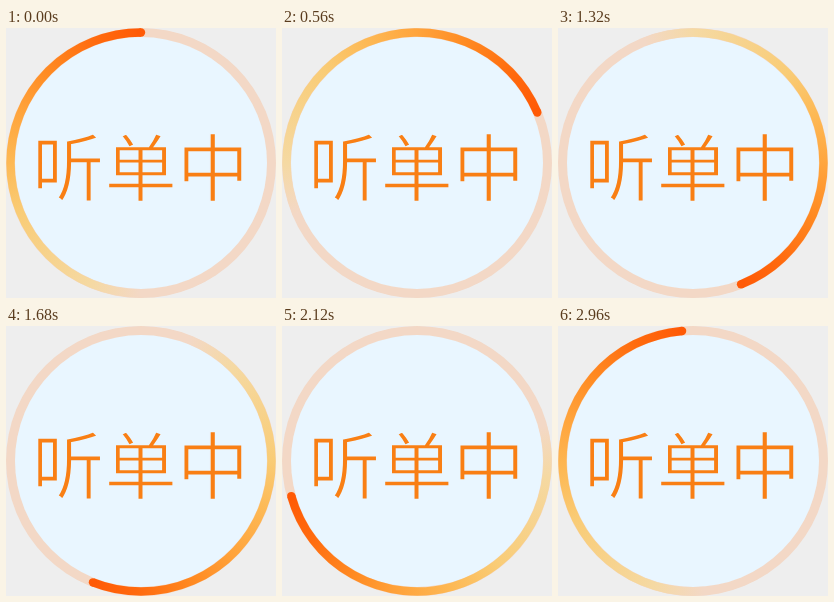
An HTML page with a canvas that plays this animation: 270 by 270 pixels, repeating every 3 s.

```html
<!DOCTYPE html>
<html lang="zh-CN">
<head>
<meta charset="utf-8">
<style>
html, body { margin: 0; width: 100%; height: 100%; overflow: hidden; background: #eee; }
canvas { display: block; }
</style>
</head>
<body>
<canvas id="stage" width="270" height="270"></canvas>
<script>
const ctx = document.getElementById('stage').getContext('2d');
const TAU = Math.PI * 2, C = 135, R = 130.5, LOOP = 3000, STEP = 40;
const TRACK_WIDTH = 9, ARC_WIDTH = 8.4;
const DISC = '#e9f6ff', TRACK = '#f3d8c6', HEAD = '#ff5a06', LABEL = '听单中';
// Degrees behind the head, colour; the last stop keeps the tail end clean
const STOPS = [[180, TRACK], [157, '#f5d9a2'], [112, '#f9cc76'], [90, '#fdb955'],
  [67, '#ffa43c'], [45, '#ff8a22'], [20, '#ff6a0e'], [0, HEAD], [-180, TRACK]];

function circle(x, y, r, fill) {
  ctx.beginPath();
  ctx.arc(x, y, r, 0, TAU);
  ctx.fillStyle = fill;
  ctx.fill();
}

// The outline in the disc colour thins the regular face to a light one
function drawLabel() {
  ctx.font = '400 72.4px "Noto Sans CJK SC", "Noto Sans CJK", sans-serif';
  ctx.textAlign = 'center';
  ctx.fillStyle = '#f97f14';
  ctx.fillText(LABEL, C - 0.4, 167);
  ctx.strokeStyle = DISC;
  ctx.lineWidth = 1.6;
  ctx.strokeText(LABEL, C - 0.4, 167);
}

function drawArc(head) {
  const tail = head - Math.PI;
  const sweep = ctx.createConicGradient(tail, C, C);
  for (const [deg, color] of STOPS) sweep.addColorStop((180 - deg) / 360, color);
  ctx.beginPath();
  ctx.arc(C, C, R, tail, head);
  ctx.strokeStyle = sweep;
  ctx.lineWidth = ARC_WIDTH;
  ctx.stroke();
  circle(C + R * Math.cos(head), C + R * Math.sin(head), ARC_WIDTH / 2, HEAD);
}

function draw() {
  const time = Math.floor(performance.now() % LOOP / STEP) * STEP;
  ctx.fillStyle = '#eee';
  ctx.fillRect(0, 0, 270, 270);
  circle(C, C, R + TRACK_WIDTH / 2, TRACK);
  circle(C, C, R - TRACK_WIDTH / 2, DISC);
  drawLabel();
  drawArc(time / LOOP * TAU - Math.PI / 2);
  requestAnimationFrame(draw);
}
draw();
</script>
</body>
</html>
```
